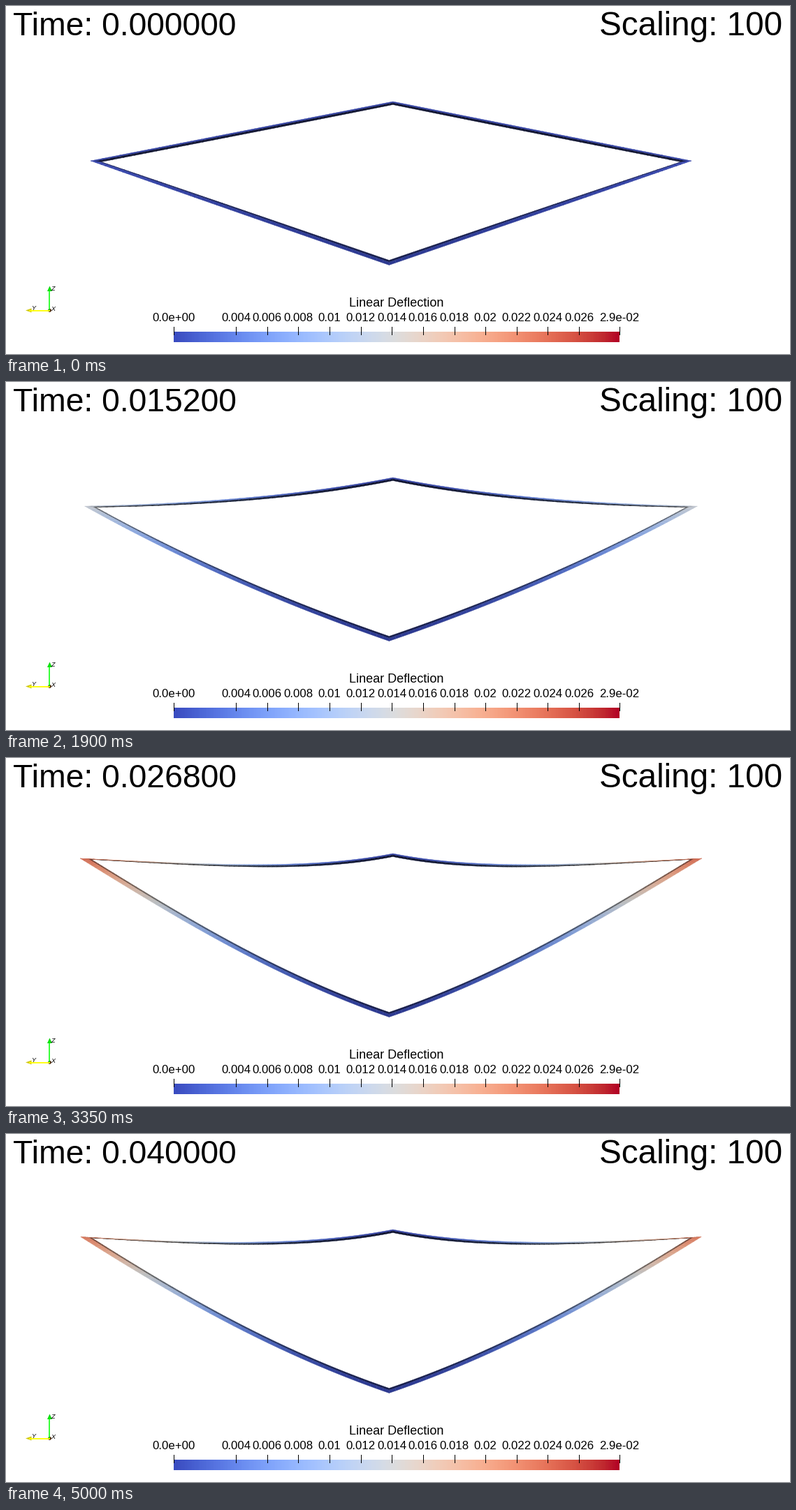
A matplotlib script that plays this animation: 1122 by 499 pixels, repeating every 5.05 s.

```python
import numpy as np
import matplotlib.pyplot as plt
from matplotlib.animation import FuncAnimation
from matplotlib.collections import PolyCollection
from matplotlib.patches import Polygon, Circle

W, H, DPI = 1122, 499, 100
FRAMES, STEP = 101, 50
FULL = 100.0          # lift that reaches the end of the colour scale
MAX_VALUE = 0.0286

plt.rcParams["font.family"] = "Liberation Sans"
cmap = plt.get_cmap("coolwarm")

fig = plt.figure(figsize=(W / DPI, H / DPI), dpi=DPI, facecolor="white")
ax = fig.add_axes([0, 0, 1, 1])
ax.set_xlim(0, W)
ax.set_ylim(H, 0)
ax.axis("off")


def label(x, y, text, px, ha="left", **kw):
    return ax.text(x, y, text, fontsize=px * 72 / DPI, ha=ha,
                   va="baseline", color="black", **kw)


# Motion: tip lift and a second bending shape, both keyed over frames
KEYS = np.array([0, 10, 18, 31, 47, 56, 67, 77, 84, 100])
TIP = np.array([0, 0, -1.65, 24.45, 78.1, 98, 82.8, 95, 99, 79.2])
BEND = np.array([0, 0, 0, -22, -8, 0, 4, 9.5, 6, -8])


def spline(keys, vals, x):
    slopes = np.zeros(len(keys))
    slopes[1:-1] = (vals[2:] - vals[:-2]) / (keys[2:] - keys[:-2])
    slopes[-1] = (vals[-1] - vals[-2]) / (keys[-1] - keys[-2])
    k = min(max(np.searchsorted(keys, x, side="right") - 1, 0), len(keys) - 2)
    h = keys[k + 1] - keys[k]
    s = (x - keys[k]) / h
    return ((2 * s**3 - 3 * s**2 + 1) * vals[k]
            + (s**3 - 2 * s**2 + s) * h * slopes[k]
            + (3 * s**2 - 2 * s**3) * vals[k + 1]
            + (s**3 - s**2) * h * slopes[k + 1])


def project(u, t, w):
    """u: sideways, t: depth (1 = far corner), w: lift."""
    d = 1 + 0.2696 * t - 0.0004 * w
    x = 551 + 2.7 * t + 430 * u / d
    y = (222 - 46.8 * t - w) / d
    return np.stack([x, y], axis=1)


N = 64
R = np.linspace(0, 1, N + 1)
RM = (R[1:] + R[:-1]) / 2


def lift(r, i):
    cantilever = (3 * r**2 - r**3) / 2
    return (spline(KEYS, TIP, i) * cantilever
            + spline(KEYS, BEND, i) * r**2 * (1 - r))


def quads(a, b):
    return np.stack([a[:-1], a[1:], b[1:], b[:-1]], axis=1)


def shade(base, k):
    rgb = base.copy()
    rgb[:, :3] *= np.reshape(k, (-1, 1))
    return rgb


def frame_bands(i):
    w = lift(R, i)
    base = cmap(np.clip(lift(RM, i) / FULL, 0, 1))
    verts, colors = [], []
    for depth in (1, -1):
        far = depth > 0
        t = depth * (1 - R)
        for side in (-1, 1):
            outer = project(side * R, t, w)
            inner = project(side * 0.964 * R, t, w)
            if far:
                outer[:, 1] -= 1.0 * (1 - R)
                inner[:, 1] += 1.5 + 2.0 * (1 - R**2)
                cut = np.full(N + 1, 0.35)
                lit, dark = 0.85, 0.25
            else:
                outer[:, 1] += 3.5 * (1 - R)
                inner[:, 1] += -3.5 * (1 - R) + 1.5 * R
                cut = 0.6 + 0.15 * R
                lit, dark = 0.75 + 0.15 * RM, 0.38 + 0.1 * RM
            mid = outer + cut[:, None] * (inner - outer)
            verts += [quads(mid, inner), quads(outer, mid)]
            colors += [shade(base, dark), shade(base, lit)]
    return np.concatenate(verts), np.concatenate(colors)


def draw_bar():
    x0, x1 = 240, 878
    ax.imshow(np.linspace(0, 1, 256)[None, :], cmap=cmap, aspect="auto",
              extent=(x0, x1, 482, 467), interpolation="bilinear")
    ax.set_xlim(0, W)
    ax.set_ylim(H, 0)
    label(558.5, 431, "Linear Deflection", 18, "center")
    marks = [(0, "0.0e+00"), (MAX_VALUE, "2.9e-02")]
    marks += [(v / 1000, f"{v / 1000:g}") for v in range(4, 27, 2)]
    for value, text in marks:
        x = x0 + (x1 - x0) * value / MAX_VALUE
        ax.plot([x, x], [459.5, 470.5], color="black", lw=0.72)
        label(x, 451.5, text, 16.8, "center")


def draw_axes():
    ax.plot([62.5, 62.5], [436, 406], color="#00ff00", lw=1.1)
    ax.plot([62.5, 34], [436.5, 436.5], color="#ffff00", lw=1.3)
    ax.add_patch(Polygon([(62.5, 401.5), (59, 409), (66, 409)],
                         color="#10d010", lw=0))
    ax.add_patch(Polygon([(28, 436.5), (36.5, 433.5), (36.5, 439.5)],
                         color="#d0c810", lw=0))
    ax.add_patch(Circle((62.5, 436.5), 2.4, color="#4a2408", lw=0))
    for x, y, text in ((66.5, 408, "Z"), (39, 436, "Y"), (67, 437, "X")):
        label(x, y, text, 9, "center", style="italic")


draw_bar()
draw_axes()
clock = label(10.5, 41.5, "", 46.4)
label(1111.5, 41.5, "Scaling: 100", 47.6, "right")
verts0, colors0 = frame_bands(0)
beams = PolyCollection(verts0, facecolors=colors0, edgecolors=colors0,
                       linewidths=0.25)
ax.add_collection(beams, autolim=False)


def update(i):
    verts, colors = frame_bands(i)
    beams.set_verts(verts)
    beams.set_facecolor(colors)
    beams.set_edgecolor(colors)
    clock.set_text(f"Time: {i * 0.0004:.6f}")
    return beams, clock


anim = FuncAnimation(fig, update, frames=FRAMES, interval=STEP,
                     repeat=True, repeat_delay=0, blit=False)
plt.show()
```
